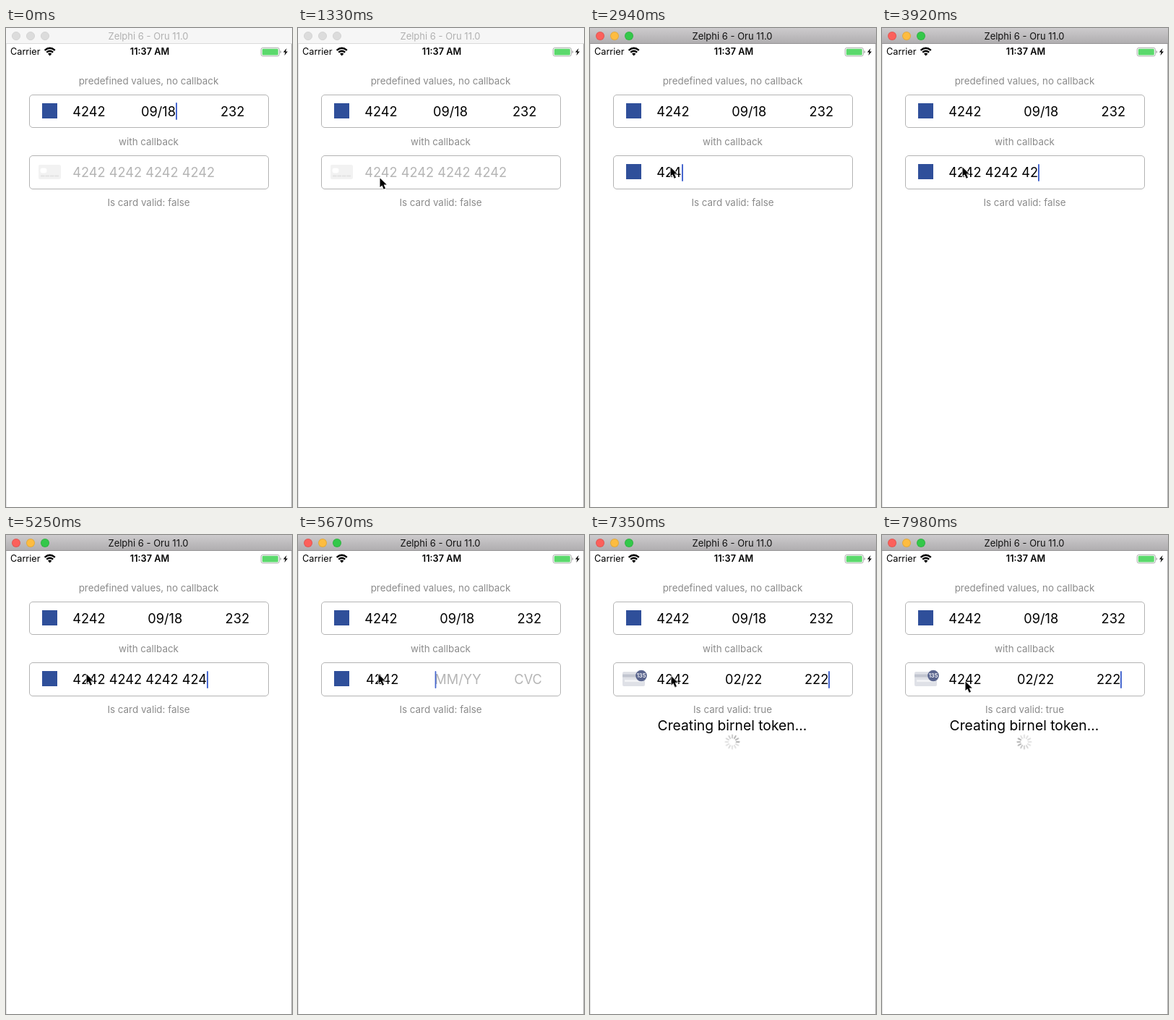
These frames come from a looping animation (396 px wide and 662 px high, 8000 ms). An HTML page:

```html
<!DOCTYPE html>
<html lang="en">
<head>
<meta charset="utf-8">
<title>Card form</title>
<style>
html, body { margin: 0; width: 100%; height: 100%; overflow: hidden; }
body { position: relative; background: #fff; font-family: Inter, Roboto, sans-serif; color: #000; }
div, svg { position: absolute; }
.line { left: 0; width: 396px; text-align: center; white-space: pre; line-height: 24px; }

/* window chrome */
.bar { left: 0; top: 0; width: 396px; height: 21px; border-bottom: 1px solid #dadada; background: #f6f6f6; color: #b1b1b1; }
.bar .line { top: 0; font-size: 13px; line-height: 23px; left: -1px; }
.bar.active { background: linear-gradient(#cdcbcd, #b0aeb0); border-color: #979597; color: #111; animation: activate 8s step-end infinite; }
.light { top: 5px; width: 12px; height: 12px; box-sizing: border-box; border: 1px solid #d4d4d4; border-radius: 50%; background: #dcdcdc; }
.active .light { border-color: #0000001a; }
.edge { top: 22px; bottom: 0; width: 1px; }

/* status bar */
.status { font-size: 12.7px; top: 21px; }

/* form */
.label { font-size: 13.4px; color: #8b8b8b; }
.field { left: 31.5px; width: 330px; height: 44.5px; border: 1px solid #b3b3b3; border-radius: 5px; }
.parts { left: 89px; width: 272px; height: 46px; overflow: hidden; font-size: 18.2px; line-height: 46px; }
.part { top: 0; white-space: pre; }
.num { left: 3.2px; }
.exp { left: 98px; }
.cvc { left: 208px; }
.hint { color: #b5b5b5; }
.caret { display: inline-block; width: 0; height: 0; position: relative; }
.caret::before { content: ""; position: absolute; left: 0; bottom: -5.5px; width: 2px; height: 24px; border-radius: 1px; background: #4868cf; }
.mark { width: 21px; height: 21px; background: #2f4f9a; }

#first .exp { animation: spreadA 8s infinite; }
#first .cvc { animation: spreadB 8s infinite; }
#first .caret { animation: blink 8s linear infinite; }
#second .num { animation: slideOut 8s infinite; }
#second .exp, #second .cvc { animation: slideIn 8s infinite; }
#blank { animation: blankCard 8s step-end infinite; }
#brand { animation: brandCard 8s linear infinite; }
#back { animation: backCard 8s linear infinite; transform-origin: 45px 204px; }
#busy { animation: busy 8s step-end infinite; inset: 0; }
#spin { left: 186px; top: 275px; animation: turn 1s steps(12) infinite; }
#pointer { left: 0; top: 0; animation: pointer 8s linear infinite; }

@keyframes activate { 0% { opacity: 0 } 18.4%, 100% { opacity: 1 } }
@keyframes spreadA { 0%, 21.5% { transform: none } 25%, 100% { transform: translateX(9.3px) } }
@keyframes spreadB { 0%, 21.5% { transform: none } 25%, 100% { transform: translateX(6.6px) } }
@keyframes blink {
  0%, .4% { opacity: 1 } 1.6%, 7% { opacity: 0 }
  8%, 12% { opacity: 1 } 13.2%, 100% { opacity: 0 }
}
@keyframes slideOut { 0%, 67.2% { transform: none } 71.5%, 100% { transform: translateX(var(--shift)) } }
@keyframes slideIn { 0%, 67.2% { transform: translateX(200px) } 71.5%, 100% { transform: none } }
@keyframes blankCard { 0% { opacity: .7 } 21.8% { opacity: 1 } 32.375%, 100% { opacity: 0 } }
@keyframes brandCard { 0%, 32.37% { opacity: 0 } 32.375%, 79.6% { opacity: 1 } 81.2%, 100% { opacity: 0 } }
@keyframes backCard {
  0%, 79.6% { opacity: 0; transform: scale(.88) }
  83%, 100% { opacity: 1; transform: none }
}
@keyframes busy { 0% { opacity: 0 } 90.1%, 100% { opacity: 1 } }
@keyframes turn { to { transform: rotate(360deg) } }
@keyframes pointer {
  0%, .8% { transform: translate(303px, 668px) }
  3.5% { transform: translate(245px, 500px) }
  7% { transform: translate(152px, 300px) }
  10.5% { transform: translate(114px, 217px) }
  11.4%, 17% { transform: translate(113px, 207px); animation-timing-function: ease-in-out }
  22%, 89.2% { transform: translate(111px, 192px); animation-timing-function: ease-in-out }
  97%, 100% { transform: translate(115px, 202px) }
}
</style>
</head>
<body>
<div class="bar">
  <div class="light" style="left:8px"></div><div class="light" style="left:28px"></div><div class="light" style="left:48px"></div>
  <div class="line">Zelphi 6 - Oru 11.0</div>
</div>
<div class="bar active">
  <div class="light" style="left:8px;background:#fc605b"></div><div class="light" style="left:28px;background:#fdbc40"></div><div class="light" style="left:48px;background:#34c84a"></div>
  <div class="line">Zelphi 6 - Oru 11.0</div>
</div>
<div class="edge" style="left:0;background:#e2e2e2"></div>
<div class="edge" style="right:0;background:#b0b0b0"></div>

<div class="line status" style="left:6px;text-align:left">Carrier</div>
<div class="line status" style="left:1px;font-weight:600">11:37 AM</div>
<svg width="396" height="44" style="left:0;top:0">
  <g fill="none" stroke="#000" stroke-width="2.3">
    <path d="M53.6 30.9Q60.7 24.6 67.8 30.9"/>
    <path d="M56.2 33.7Q60.7 29.8 65.2 33.7"/>
  </g>
  <path d="M60.7 38.4 58 35.6Q60.7 33.6 63.4 35.6Z"/>
  <rect x="353.2" y="27.3" width="25.2" height="11.6" rx="2.6" fill="#fff" stroke="#a4a4a4" stroke-width=".9"/>
  <rect x="354.8" y="28.8" width="22" height="8.6" rx="1.2" fill="#5bd96c"/>
  <path d="M379.6 31v4.2q1.5-.7 1.5-2.1t-1.5-2.1Z" fill="#a4a4a4"/>
  <path d="M388.6 28 383.9 33.6H386.7L385.4 38 390 32.4H387.2Z"/>
</svg>

<div class="line label" style="top:60.5px;left:-.5px">predefined values, no callback</div>
<div class="line label" style="top:145px;left:-.5px">with callback</div>
<div class="line label" style="top:229px;left:-.5px">Is card valid: <span id="valid">false</span></div>

<div class="field" style="top:91.5px"></div>
<div class="mark" style="left:50px;top:104px"></div>
<div class="parts" id="first" style="top:91.7px">
  <div class="part num">4242</div>
  <div class="part exp">09/18<i class="caret"></i></div>
  <div class="part cvc">232</div>
</div>

<div class="field" style="top:176px"></div>
<svg id="blank" width="90" height="220" style="left:0;top:0">
  <rect x="45" y="189" width="31" height="20" rx="2" fill="#ededed"/>
  <rect x="47.5" y="193.5" width="9" height="7" rx="3" fill="#fff"/>
  <path d="M48 204.5h25" stroke="#d6d6d6" stroke-width="2" stroke-dasharray="5.5 1"/>
</svg>
<div id="brand" class="mark" style="left:50px;top:188px"></div>
<svg id="back" width="90" height="220" style="left:0;top:0">
  <rect x="45" y="189" width="31" height="20" rx="2" fill="#dfe1e7"/>
  <path d="M45 194.5h31" stroke="#c1c5cf" stroke-width="4"/>
  <path d="M48 201.5h25" stroke="#f1f2f5" stroke-width="3"/>
  <circle cx="71" cy="194.5" r="7.8" fill="#5a658e"/>
  <text x="71" y="197.3" font-size="7.6" font-weight="600" fill="#fff" text-anchor="middle">135</text>
</svg>
<div class="parts" id="second" style="top:176px">
  <div class="part num"></div>
  <div class="part exp"></div>
  <div class="part cvc"></div>
</div>

<div id="busy">
  <div class="line" style="top:250.5px;left:-1px;font-size:19.3px">Creating birnel token...</div>
  <svg id="spin" width="22" height="22" viewBox="-11 -11 22 22"></svg>
</div>

<svg id="pointer" width="14" height="20" viewBox="-1.5 -1.5 14 20" style="margin:-1.5px 0 0 -1.5px">
  <path d="M0 0V12.6L2.9 9.9 5.2 15.3 7.5 14.3 5.2 9.1H9.3Z" stroke="#fff" stroke-width="1.6" paint-order="stroke" stroke-linejoin="round"/>
</svg>

<script>
const LOOP = 8000, FOCUS = 1750, VALID = 7140;
const $ = s => document.querySelector(s);

// each field: text stages, the hint, and when each stage is typed
const grow = s => [...s].map((c, i) => s.slice(0, i + 1)).filter(p => !p.endsWith(' '));
const fields = [
  { el: '.num', hint: '4242 4242 4242 4242', from: FOCUS, to: 5380, stages: grow('4242 4242 4242 4242'),
    times: [2590, 2730, 2940, 3080, 3220, 3430, 3500, 3570, 3710, 3850, 3990, 4130, 4270, 4760, 5180, 5320] },
  { el: '.exp', hint: 'MM/YY', from: 5380, to: 6370, stages: ['0', '02/', '02/2', '02/22'],
    times: [5740, 5880, 6020, 6300] },
  { el: '.cvc', hint: 'CVC', from: 6370, to: LOOP, stages: grow('222'), times: [6680, 6900, VALID] }
];

for (const f of fields) {
  const box = $('#second ' + f.el);
  box.innerHTML = '<span></span><i class="caret"></i><span class="hint"></span>';
  [f.text, f.caret, f.ghost] = box.children;
}

// distance that brings the last four digits to the left edge
const probe = fields[0].text;
probe.textContent = '4242 4242 4242 ';
$('#second').style.setProperty('--shift', -probe.getBoundingClientRect().width + 'px');

$('#spin').innerHTML = Array.from({ length: 12 }, (_, i) =>
  `<path d="M0-5.6V-9.6" stroke="#777" stroke-width="1.8" stroke-linecap="round"
    opacity="${0.25 + 0.45 * Math.max(0, (i - 5) / 6)}" transform="rotate(${i * 30})"/>`).join('');

function put(el, text) {
  if (el.textContent !== text) el.textContent = text;
}

let start;
function draw(now) {
  start ??= now;
  const t = (now - start) % LOOP;
  for (const f of fields) {
    const n = f.times.filter(at => at <= t).length;
    put(f.text, n ? f.stages[n - 1] : '');
    put(f.ghost, n ? '' : f.hint);
    f.caret.style.visibility = t >= f.from && t < f.to ? 'visible' : 'hidden';
  }
  put($('#valid'), String(t >= VALID));
  requestAnimationFrame(draw);
}
requestAnimationFrame(draw);
</script>
</body>
</html>
```
